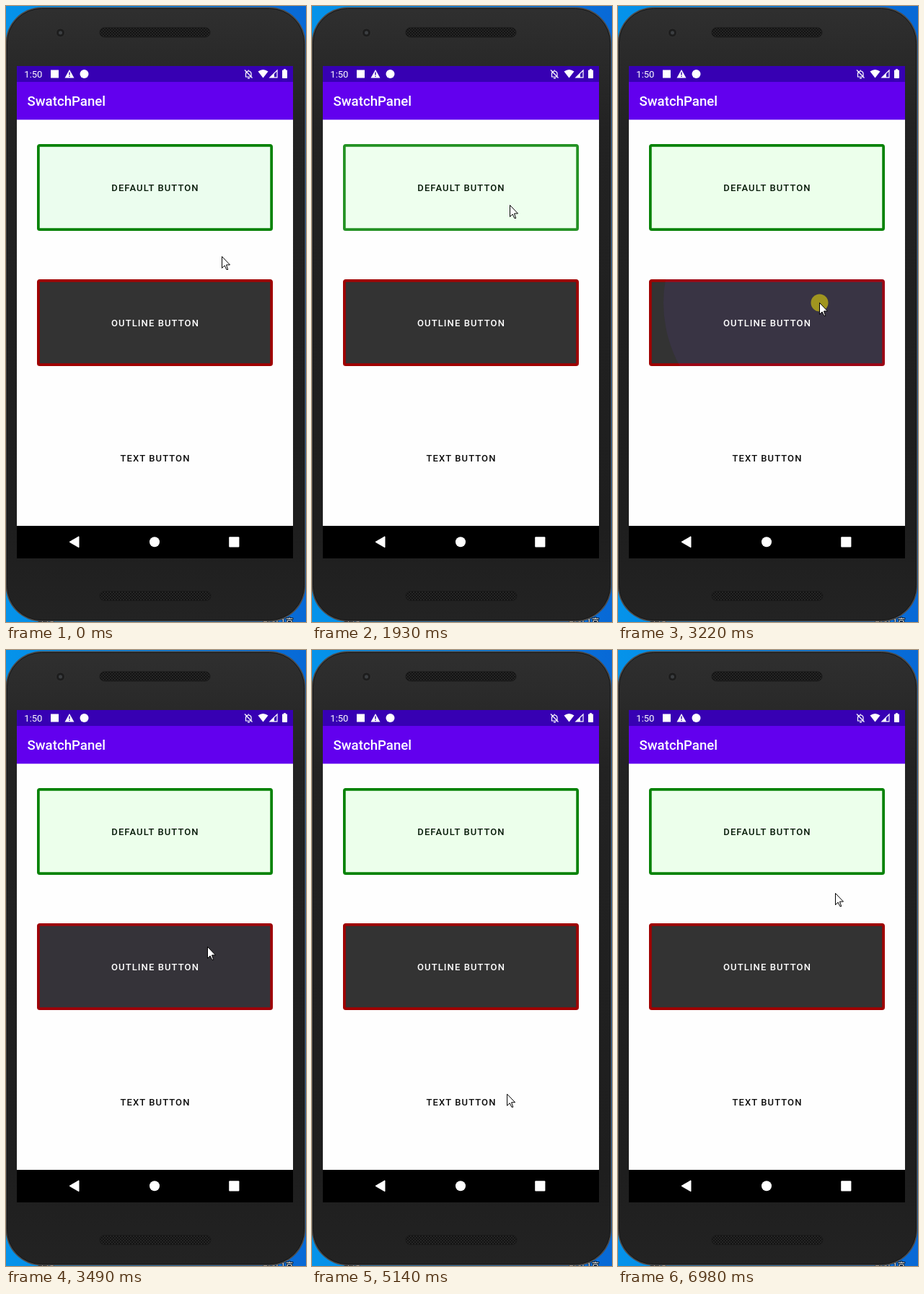
Animation of 416 by 852 pixels, one loop 7710 ms. Source, as an HTML page:

```html
<!DOCTYPE html>
<html lang="en">
<head>
<meta charset="utf-8">
<title>Button ripples</title>
<style>
  html, body { margin: 0; width: 100%; height: 100%; overflow: hidden; background: #0878de; }
  svg { display: block; width: 100vw; height: 100vh; }
  text { font-family: Roboto, "Open Sans", sans-serif; }
  .label { font-size: 13px; font-weight: 500; letter-spacing: .085em; text-anchor: middle; }
  .desk { font: 12px "Noto Sans CJK KR", "Noto Sans CJK", sans-serif; fill: #fff; stroke: #123; stroke-width: 2; paint-order: stroke; }
</style>
</head>
<body>
<svg viewBox="0 0 416 852" preserveAspectRatio="none">
  <defs>
    <linearGradient id="desk" x2="1"><stop stop-color="#0593ea"/><stop offset="1" stop-color="#0869d6"/></linearGradient>
    <linearGradient id="body" x2="0" y2="1">
      <stop stop-color="#2f2f2f"/><stop offset=".09" stop-color="#292929"/><stop offset=".2" stop-color="#222"/>
      <stop offset=".85" stop-color="#1e1e1e"/><stop offset="1" stop-color="#232323"/>
    </linearGradient>
    <pattern id="mesh" width="4" height="4" patternUnits="userSpaceOnUse">
      <rect width="4" height="4" fill="#252525"/>
      <circle cx="1" cy="1" r="1" fill="#0d0d0d"/><circle cx="3" cy="3" r="1" fill="#0d0d0d"/>
    </pattern>
    <clipPath id="clipDefault"><rect x="43" y="191" width="327" height="120" rx="4"/></clipPath>
    <clipPath id="clipOutline"><rect x="43" y="378" width="327" height="120" rx="4"/></clipPath>
    <clipPath id="clipText"><rect x="43" y="565" width="327" height="120.5" rx="4"/></clipPath>
  </defs>

  <!-- desktop and phone -->
  <rect width="416" height="852" fill="url(#desk)"/>
  <text class="desk" x="356" y="856">번지 1호</text>
  <text class="desk" x="45" y="858">폴더</text>
  <rect x="-.5" y="1.5" width="416" height="850" rx="50" fill="#4c4c4c"/>
  <rect x="1.5" y="3.500" width="412" height="846" rx="48" fill="url(#body)" stroke="#161616"/>
  <circle cx="75.500" cy="37" r="6" fill="#1d1d1d" stroke="#333"/>
  <circle cx="75.500" cy="37" r="2.500" fill="#3c3f42"/>
  <g fill="url(#mesh)" stroke="#191919">
    <rect x="130" y="30" width="153" height="13" rx="6.500"/>
    <rect x="130" y="809.500" width="154" height="13" rx="6.500"/>
  </g>

  <!-- screen -->
  <rect x="15" y="83" width="383" height="681" fill="#000"/>
  <rect x="15" y="83" width="383" height="22.500" fill="#3700b3"/>
  <rect x="15" y="157" width="383" height="562" fill="#fefefe"/>
  <rect x="15" y="105" width="383" height="52.300" fill="#6200ee"/>
  <text x="29.500" y="138.300" font-size="18.64" font-weight="500" fill="#fff">SwatchPanel</text>

  <!-- status bar -->
  <g fill="#fff">
    <text x="25.300" y="99" font-size="13.05">1:50</text>
    <rect x="62" y="88.500" width="11" height="11"/>
    <path d="M88 88L94.500 99.500H81.500Z"/>
    <path d="M88 91.500V95.500M88 96.800V98" stroke="#3700b3" stroke-width="1.400"/>
    <circle cx="108.500" cy="94" r="6"/>
    <path d="M332.500 98H340V93Q339.500 90 336.300 90Q333 90 332.500 93ZM336.300 88.500V90M331 88.500L341.500 99.500M335 99.800H338" fill="none" stroke="#fff" stroke-width="1.200"/>
    <path d="M349.500 90.500Q356.500 85.500 363.500 90.500L356.500 99.500Z"/>
    <path d="M376 89V98.800H366Z" fill="none" stroke="#fff" stroke-width="1.200"/>
    <path d="M372 92.500V99H365.500Z"/>
    <path d="M385 88.500V87.300H388V88.500H389.200Q390 88.500 390 89.300V99.200Q390 100 389.200 100H383.800Q383 100 383 99.200V89.300Q383 88.500 383.800 88.500Z"/>
  </g>

  <!-- navigation -->
  <g fill="#fff">
    <path d="M88 741.300L101 733.800V748.800Z" stroke="#fff" stroke-linejoin="round"/>
    <circle cx="206" cy="741.300" r="7"/>
    <rect x="309.200" y="734.200" width="14.200" height="14.200" rx="1"/>
  </g>

  <!-- buttons: ripples lie under the labels -->
  <g stroke-width="3.73">
    <rect id="green" x="44.860" y="192.860" width="323.270" height="116.270" rx="2" stroke="#058205"/>
    <rect x="44.860" y="379.860" width="323.270" height="116.270" rx="2" fill="#333" stroke="#a00000"/>
  </g>
  <g clip-path="url(#clipDefault)"><circle id="rippleDefault" fill="#fff"/></g>
  <g clip-path="url(#clipOutline)"><circle id="rippleOutline" fill="#783cf5"/></g>
  <g clip-path="url(#clipText)"><circle id="rippleText" fill="#783cf5"/></g>
  <text class="label" x="207" y="255.700" fill="#061a08">DEFAULT BUTTON</text>
  <text class="label" x="207" y="443" fill="#fff">OUTLINE BUTTON</text>
  <text class="label" x="207" y="630.300" fill="#0c0c0c">TEXT BUTTON</text>

  <circle id="press" r="12" fill="#fff000" fill-opacity=".52"/>
  <path id="cursor" d="M0 0V16L3.600 12.500L6.300 18H8.200L6 11.500H11Z" fill="#fff" stroke="#000"/>
</svg>
<script>
const LOOP = 7710, STEP = 70;
const el = id => document.getElementById(id);

// Each move: start time, number of steps, start, bend and end points.
const moves = [
  [1310, 4, [299.5, 346.5], [291, 305], [274.5, 275.5]],
  [2200, 7, [274.5, 275.5], [267, 340], [279.5, 410.5]],
  [3690, 11, [279.5, 410.5], [229, 530], [270.5, 618.5]],
  [5140, 12, [270.5, 618.5], [273, 510], [296.5, 347.5]],
  [5980, 3, [296.5, 347.5], [288, 341], [296.5, 340.5]],
  [6910, 2, [296.5, 340.5], [299, 339], [301.5, 336.5]]
];

// Each tap: ripple, start time, centre, peak opacity, resting opacity, time it clears.
const taps = [
  { id: 'rippleDefault', start: 1650, x: 274.5, y: 275.5, peak: .24, rest: 0, clear: 2070 },
  { id: 'rippleOutline', start: 3150, x: 279.5, y: 410.5, peak: .13, rest: .03, clear: 3690 },
  { id: 'rippleText', start: 4520, x: 269, y: 619, peak: .13, rest: 0, clear: 4940 }
];

const clamp = v => Math.min(1, Math.max(0, v));
const mix = (a, b, p) => a + (b - a) * p;
const smooth = p => p * p * (3 - 2 * p);
// Whole steps since a start time, allowing for a clock that runs slightly short.
const stepsSince = (start, t) => Math.floor((t - start + 10) / STEP);

function cursorAt(t) {
  let at = moves[0][2];
  for (const [start, steps, a, b, c] of moves) {
    if (t < start) break;
    const p = smooth(clamp((stepsSince(start, t) + 1) / steps));
    at = a.map((v, i) => mix(mix(v, b[i], p), mix(b[i], c[i], p), p));
  }
  return at;
}

function drawRipple(tap, t) {
  const age = stepsSince(tap.start, t);
  const grow = clamp(age / 2), fade = clamp((age - 3) / 2);
  const ripple = el(tap.id);
  const active = t >= tap.start && t < tap.clear;
  ripple.setAttribute('cx', mix(tap.x, 206.5, grow));
  ripple.setAttribute('cy', tap.y);
  ripple.setAttribute('r', mix(100, 260, grow));
  const alpha = mix(mix(tap.peak * .25, tap.peak, grow), tap.rest, fade);
  ripple.setAttribute('opacity', active ? alpha : 0);
}

function draw(t) {
  const place = `translate(${cursorAt(t).join(' ')})`;
  el('cursor').setAttribute('transform', place);
  el('press').setAttribute('transform', place);
  const pressed = taps.some(({ start }) => t >= start && t < start + 2 * STEP);
  el('press').setAttribute('opacity', pressed ? 1 : 0);
  el('green').setAttribute('fill', t < 1650 ? '#ebfdee' : '#ecffeb');
  taps.forEach(tap => drawRipple(tap, t));
}

const begin = performance.now();
function tick() {
  draw((performance.now() - begin) % LOOP);
  requestAnimationFrame(tick);
}
tick();
</script>
</body>
</html>
```
